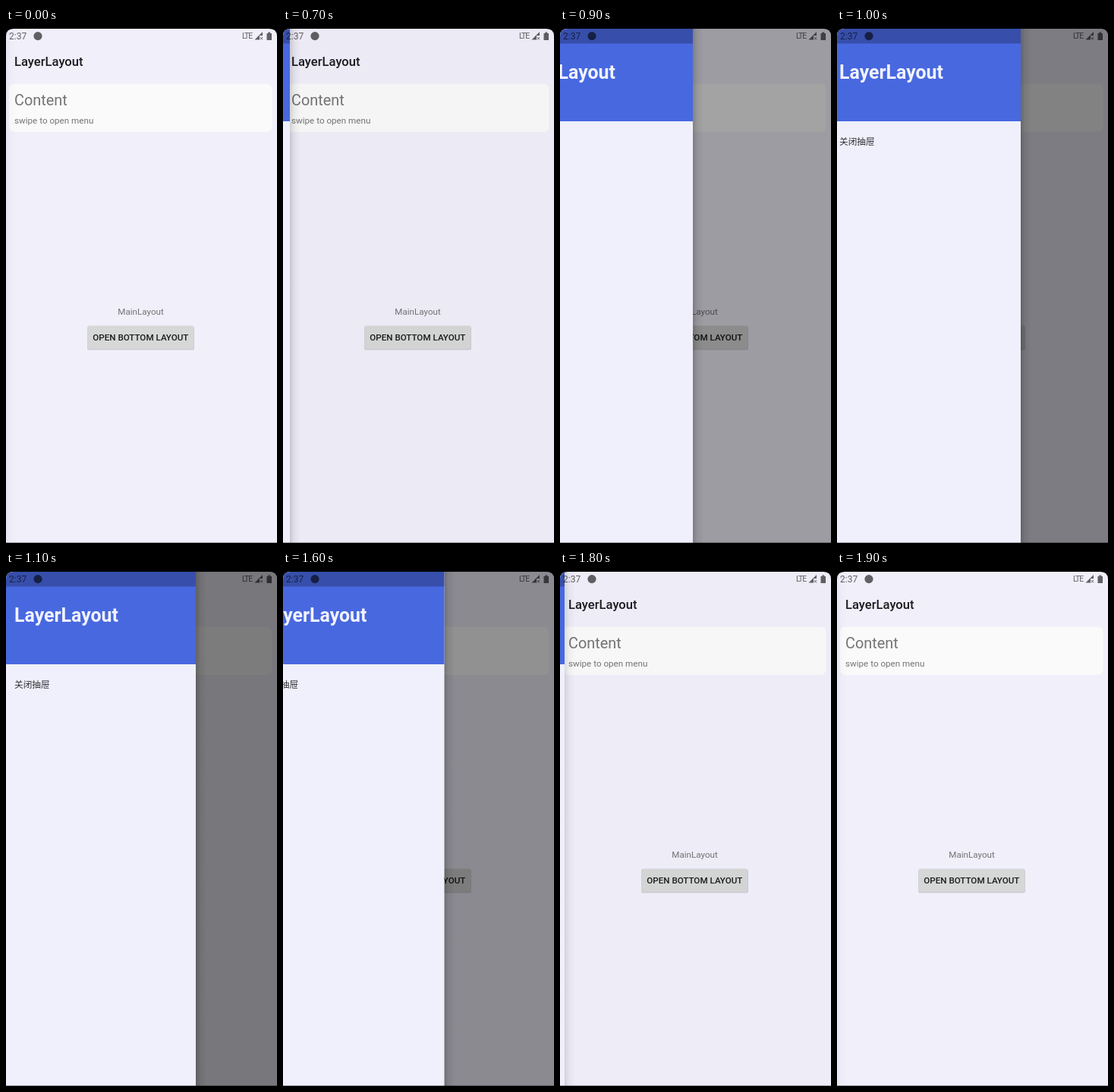
An HTML page for the animation above (3100 ms loop, 357 by 679 pixels).

```html
<!DOCTYPE html>
<html lang="en">
<head>
<meta charset="utf-8">
<title>LayerLayout</title>
<style>
  @property --open {
    syntax: "<number>";
    inherits: true;
    initial-value: 0;
  }
  html, body {
    margin: 0;
    width: 100%;
    height: 100%;
    overflow: hidden;
    background: #000;
  }
  svg {
    display: block;
    width: 357px;
    height: 679px;
    font-family: Roboto, "Noto Sans CJK SC", "Noto Sans CJK", sans-serif;
    font-size: 11.65px;
    animation: slide 3100ms step-end infinite;
  }
  .title { font-size: 16.6px; font-weight: 500; fill: #1c1b20; }
  .heading { font-size: 19.9px; }
  .grey { fill: #747477; }
  .button { font-weight: 500; fill: #1c1c1c; }
  .brand { font-size: 24.9px; font-weight: 700; fill: #f1f3fd; }
  .item { font-family: "Noto Sans CJK SC", "Noto Sans CJK", sans-serif; fill: #2e2e32; }
  .scrim { opacity: calc(var(--open) * .5); }
  .drawer { transform: translateX(calc((var(--open) - 1) * 250px)); }
  .edge { opacity: calc(.2 + var(--open) * 15); }

  /* ease-in-out travel, sampled every 100 ms */
  @keyframes slide {
    0%      { --open: 0; }
    22.575% { --open: .036; }
    25.8%   { --open: .31; }
    29.025% { --open: .7; }
    32.25%  { --open: .968; }
    35.48%  { --open: 1; }
    51.61%  { --open: .85; }
    54.835% { --open: .376; }
    58.06%  { --open: .024; }
    61.285% { --open: 0; }
    100%    { --open: 0; }
  }
</style>
</head>
<body>
<svg viewBox="0 0 357 679">
  <defs>
    <clipPath id="screen">
      <path d="M0 679V11Q0 1 10 1H347Q357 1 357 11V679Z"/>
    </clipPath>
    <linearGradient id="shade">
      <stop offset="0" stop-color="#000" stop-opacity=".2"/>
      <stop offset=".4" stop-color="#000" stop-opacity=".07"/>
      <stop offset="1" stop-color="#000" stop-opacity="0"/>
    </linearGradient>
  </defs>

  <g clip-path="url(#screen)">
    <rect width="357" height="679" fill="#f0effa"/>

    <text class="title" x="11" y="50">LayerLayout</text>
    <rect x="4" y="73.5" width="346.5" height="63.5" rx="7" fill="#fafafa"/>
    <text class="heading grey" x="11" y="102">Content</text>
    <text class="grey" x="11" y="126.3">swipe to open menu</text>

    <text class="grey" x="177.5" y="377.5" text-anchor="middle">MainLayout</text>
    <rect x="107" y="393.5" width="141" height="31" rx="2" fill="#000" opacity=".14"/>
    <rect x="107.5" y="392.5" width="139.5" height="30.5" rx="2" fill="#d6d7d7"/>
    <text class="button" x="177.3" y="412" text-anchor="middle">OPEN BOTTOM LAYOUT</text>

    <rect class="scrim" width="357" height="679"/>

    <g class="drawer">
      <rect class="edge" x="250" width="14" height="679" fill="url(#shade)"/>
      <rect width="250" height="679" fill="#eff0fc"/>
      <rect width="250" height="123" fill="#4868e0"/>
      <rect width="250" height="20.5" fill="#000" opacity=".24"/>
      <text class="brand" x="11" y="67.3">LayerLayout</text>
      <text class="item" x="11" y="153.7">关闭抽屉</text>
    </g>

    <g opacity=".6">
      <text x="4" y="15" font-size="12">2:37</text>
      <circle cx="42" cy="10.6" r="5.6"/>
      <text x="311" y="14.3" font-size="10.4" letter-spacing="-1.1">LTE</text>
      <path d="M327.5 15.5L338 5V10H334V15.5Z"/>
      <path d="M335 12L338 15.3M338 12L335 15.3" stroke="#000"/>
      <path d="M343.5 7H345.3V5.5H348.2V7H350V16H343.5Z"/>
    </g>

    <rect y="678" width="357" height="1" opacity=".35"/>
  </g>
</svg>
</body>
</html>
```
